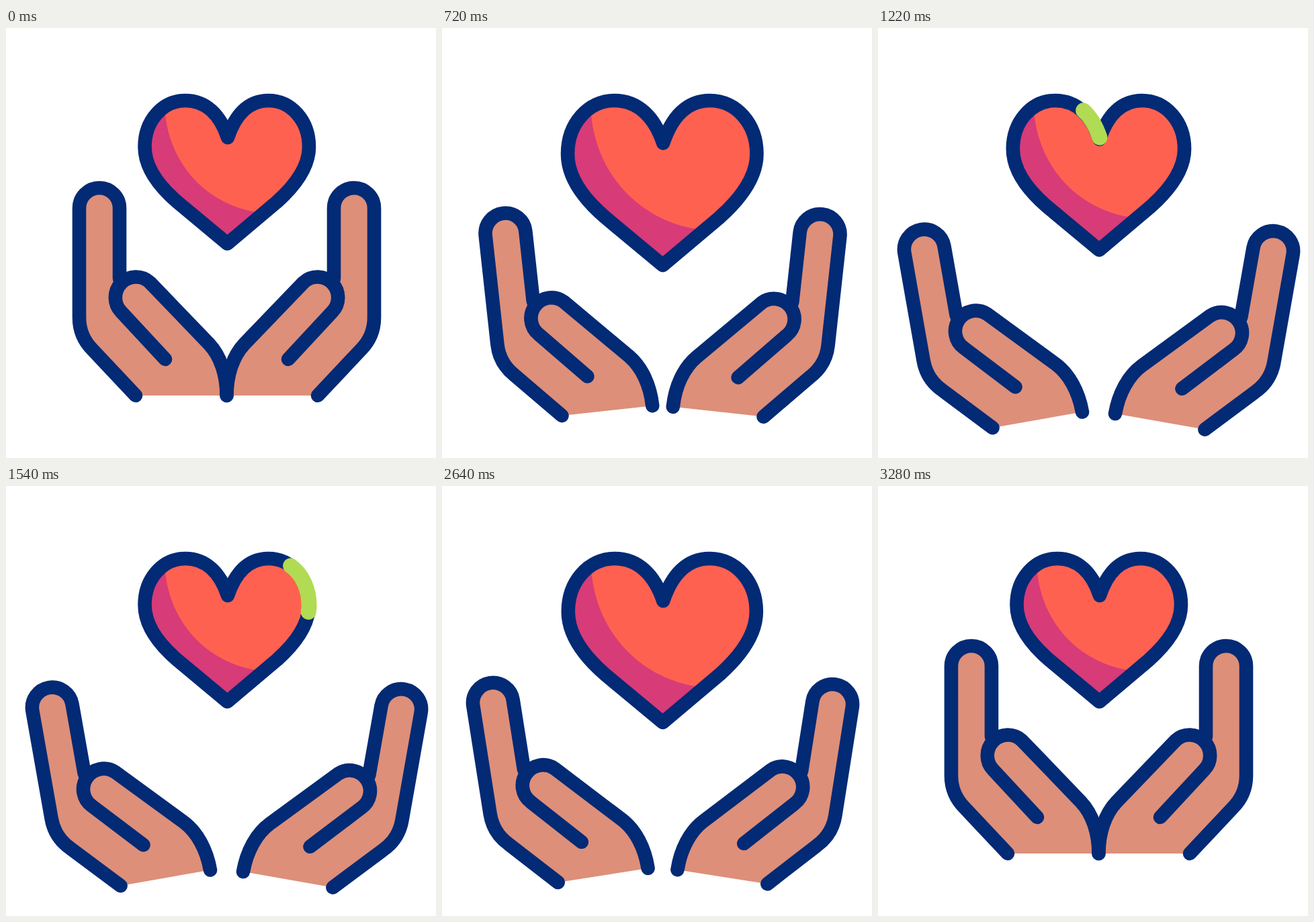
Write an HTML page that moves like this. It is 640x640 px and loops after 3620 ms.

```html
<!DOCTYPE html>
<html lang="en">
<head>
<meta charset="utf-8">
<title>Caring hands</title>
<style>
  html, body { margin: 0; width: 100%; height: 100%; overflow: hidden; background: #fff; }
  svg { display: block; width: 100%; height: 100%; }
  .line { fill: none; stroke: #032a75; stroke-width: 20.6; stroke-linecap: round; stroke-linejoin: round; }
  .skin { fill: #dd8f79; }
  #glint { fill: none; stroke: #b1db52; stroke-width: 23; stroke-linecap: round; stroke-linejoin: round; }
</style>
</head>
<body>
<svg viewBox="0 0 640 640">
  <defs>
    <path id="heartShape" d="M330 163 C319 130 298 108 267 108 C233 108 206.5 138 206.5 177
      C206.5 207 226 234 255 259 L329.5 321 L403 259 C431 234 451 207 451 177
      C451 138 424.5 108 390.5 108 C360 108 341 130 330 163Z"/>
    <clipPath id="heartClip"><use href="#heartShape"/></clipPath>
    <g id="hand">
      <path class="skin" d="M193 547 L129 479 C116 466 109 449 109 431 V268 A30 30 0 0 1 169 268 V400 L237 480 L328.5 547Z"/>
      <path class="line" d="M193 547 L129 479 C116 466 109 449 109 431 V268 A30 30 0 0 1 169 268 V373"/>
      <path class="line" style="fill:#dd8f79" d="M237 493 L171.5 422.5 A30.6 30.6 0 0 1 214 378.5 L302 470 C319 488 328.5 516 328.5 547"/>
    </g>
  </defs>

  <use id="leftHand" href="#hand"/>
  <g transform="translate(657 0) scale(-1 1)"><use id="rightHand" href="#hand"/></g>

  <g id="heart">
    <use href="#heartShape" fill="#ff6151"/>
    <path clip-path="url(#heartClip)" fill="#d73b78"
      d="M233 98 L237 128 C245 205 300 262 372 274 L420 282 V340 H190 V98Z"/>
    <use id="outline" class="line" href="#heartShape"/>
  </g>
  <path id="glint" pathLength="100"/>
</svg>
<script>
  const LOOP = 3620;
  const GLINT_LENGTH = 10;
  const el = id => document.getElementById(id);
  const [leftHand, rightHand, heart, outline, glint] =
    ['leftHand', 'rightHand', 'heart', 'outline', 'glint'].map(el);
  glint.setAttribute('d', el('heartShape').getAttribute('d'));

  function ease(t, from, to) {
    const x = Math.min(1, Math.max(0, (t - from) / (to - from)));
    return x * x * (3 - 2 * x);
  }

  // Rises over [a, b], holds, then falls over [c, d].
  const swell = (t, a, b, c, d) => ease(t, a, b) - ease(t, c, d);

  function placeHand(hand, open, drop) {
    hand.setAttribute('transform',
      `translate(${-24.5 * open} ${drop * open}) rotate(${-10 * open} 328.5 547)`);
  }

  function draw(t) {
    const open = swell(t, 228, 1073, 2477, 3292);
    placeHand(leftHand, open, 24.5);
    placeHand(rightHand, open, 27);

    const grow = swell(t, 205, 645, 835, 1435) + swell(t, 2111, 2711, 2890, 3285);
    const scale = 1 + 0.151 * grow;
    heart.setAttribute('transform',
      `translate(${328.75 - grow} 108) scale(${scale}) translate(-328.75 -108)`);
    outline.style.strokeWidth = 20.6 / scale;

    // The glint runs once around the outline and back again.
    const head = (100 + GLINT_LENGTH) * swell(t, 1136, 1728, 1780, 2372);
    const tail = Math.max(0, head - GLINT_LENGTH);
    const length = Math.min(100, head) - tail;
    glint.style.display = head > 0 && length > 0.01 ? '' : 'none';
    glint.setAttribute('stroke-dasharray', `${length} 300`);
    glint.setAttribute('stroke-dashoffset', -tail);
  }

  const start = performance.now();
  function tick() {
    draw((performance.now() - start) % LOOP);
    requestAnimationFrame(tick);
  }
  tick();
</script>
</body>
</html>
```
